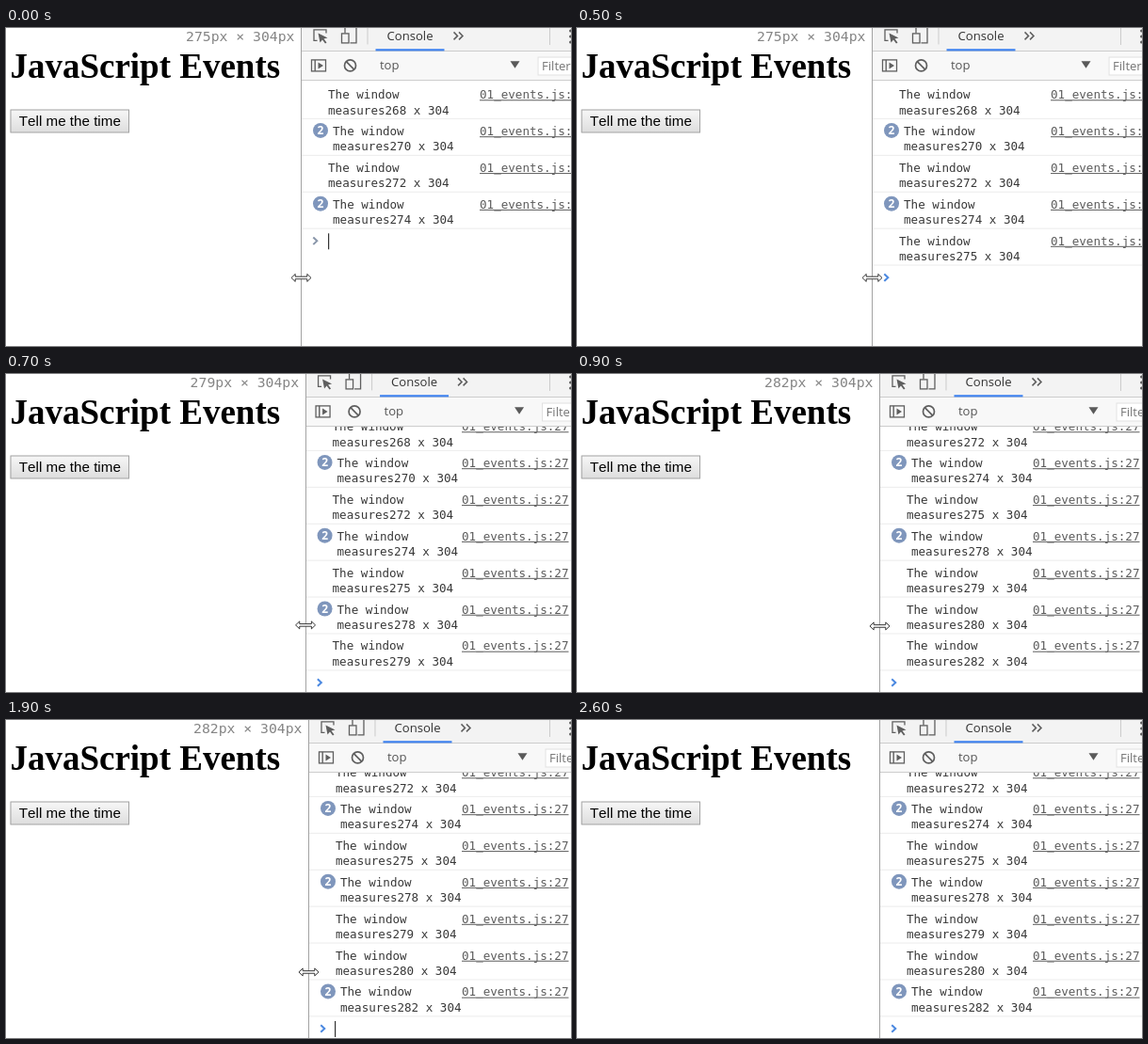
Write an HTML page with a canvas that moves like this. It is 600x338 px and loops after 2.7 s.

```html
<!DOCTYPE html>
<html lang="en">
<head>
<meta charset="utf-8">
<title>JavaScript Events</title>
<style>
  html, body { margin: 0; width: 100%; height: 100%; overflow: hidden; background: #fff; }
  canvas { display: block; }
</style>
</head>
<body>
<canvas id="stage" width="600" height="338"></canvas>
<script>
const ctx = document.getElementById('stage').getContext('2d');
const W = 600, H = 338, LOOP = 2700;
const ZOOM = 1.14, ROW = 38.9, LIST_TOP = 57;
const MONO = '"DejaVu Sans Mono", monospace';
const UI = '"Open Sans", sans-serif';
const SIZES = [268, 270, 272, 274, 275, 278, 279, 280, 282];
const REPEATED = [270, 274, 278];

// Each step: start time, page width, number of log entries.
const STEPS = [[0, 275, 4], [100, 275, 5], [600, 278, 6], [700, 279, 7], [800, 280, 8], [900, 282, 9]];

function text(str, x, y, font, color) {
  ctx.font = font;
  ctx.fillStyle = color;
  ctx.fillText(str, x, y);
}

function rect(x, y, w, h, color) {
  ctx.fillStyle = color;
  ctx.fillRect(x, y, w, h);
}

function path(points, { stroke, fill, width = 1, close = false }) {
  ctx.beginPath();
  points.forEach(([x, y]) => ctx.lineTo(x, y));
  if (close) ctx.closePath();
  if (fill) { ctx.fillStyle = fill; ctx.fill(); }
  if (stroke) { ctx.strokeStyle = stroke; ctx.lineWidth = width; ctx.stroke(); }
}

function box(x, y, w, h, stroke, width) {
  ctx.strokeStyle = stroke;
  ctx.lineWidth = width;
  ctx.strokeRect(x, y, w, h);
}

function disc(x, y, r, color) {
  ctx.fillStyle = color;
  ctx.beginPath();
  ctx.arc(x, y, r, 0, Math.PI * 2);
  ctx.fill();
}

function chevron(x, y, w, h, color, width) {
  path([[x, y - h], [x + w, y], [x, y + h]], { stroke: color, width });
}

function drawPage() {
  rect(0, 0, W, H, '#fff');
  text('JavaScript Events', 4.4, 52.5, 'bold 37px "Liberation Serif", serif', '#000');
  const shade = ctx.createLinearGradient(0, 87, 0, 111);
  shade.addColorStop(0, '#f7f7f7');
  shade.addColorStop(1, '#dddddd');
  rect(4.5, 87, 126, 24, shade);
  box(5, 87, 125.5, 24, '#a2a2a2', 1);
  text('Tell me the time', 13.8, 103.5, '15.2px "Liberation Sans", sans-serif', '#000');
}

function drawSizeLabel(width, edge) {
  ctx.textAlign = 'right';
  text(`${width}px × 304px`, edge - 7, 13.5, '14.75px ' + MONO, '#858585');
  ctx.textAlign = 'left';
}

function drawToolbars(edge) {
  const ink = '#5f5f5f';
  rect(edge, 0, W - edge, 25, '#f3f3f3');
  rect(edge, 25, W - edge, 31, '#f8f8f8');
  rect(edge, 24, W - edge, 1, '#cdcdcd');
  rect(edge, 55, W - edge, 1, '#cdcdcd');

  ctx.save();
  ctx.translate(edge, -0.6);
  // element picker and device toggle
  path([[17, 14], [13.5, 14], [13.5, 2.5], [26.5, 2.5], [26.5, 6]], { stroke: ink, width: 1.3 });
  path([[18, 6], [28, 11], [24, 12], [27, 16], [25.5, 17], [22.5, 13], [20, 16]], { fill: ink, close: true });
  path([[46.5, 6], [46.5, 0], [58.5, 0], [58.5, 16.5], [52, 16.5]], { stroke: ink, width: 1.3 });
  box(43, 6.5, 7.5, 10, ink, 1.3);
  rect(70, 0, 1, 18, '#cccccc');

  text('Console', 91, 14, '13.1px ' + UI, '#333');
  rect(79, 22.8, 73, 2.2, '#4285f0');
  chevron(162, 9, 4, 4, ink, 1.5);
  chevron(167.5, 9, 4, 4, ink, 1.5);

  // sidebar toggle and clear button
  box(11, 34.5, 15, 12, ink, 1.3);
  rect(14, 34.5, 1.4, 12, ink);
  path([[18, 37], [23.5, 40.5], [18, 44]], { fill: ink, close: true });
  ctx.beginPath();
  ctx.arc(52, 40.5, 6, 0, Math.PI * 2);
  ctx.strokeStyle = ink;
  ctx.lineWidth = 1.7;
  ctx.stroke();
  path([[47.8, 36.3], [56.2, 44.7]], { stroke: ink, width: 1.7 });

  text('top', 83.5, 45, '13.1px ' + UI, '#555');
  path([[222, 35.8], [232, 35.8], [227, 43.4]], { fill: '#5a5a5a', close: true });
  rect(251, 31, W, 20, '#fff');
  box(251.5, 31.6, W, 19, '#e0e0e0', 1);
  text('Filter', 255.5, 46, '13.1px ' + UI, '#757575');
  ctx.restore();

  rect(577, 0, 1, 18, '#cccccc');
  [3, 9, 15].forEach(y => disc(599.5, y, 1.5, ink));
}

function drawEntry(size, top, edge, linkX, repeated) {
  const font = '12.57px ' + MONO;
  const x = edge + (repeated ? 33.5 : 28.5);
  if (repeated) {
    disc(edge + 20.5, top + 13, 8, '#7f96bc');
    ctx.textAlign = 'center';
    text('2', edge + 20.5, top + 17.5, 'bold 12px ' + UI, '#fff');
    ctx.textAlign = 'left';
  }
  text('The window', x, top + 18, font, '#383838');
  text(`measures${size} x 304`, x, top + 34.5, font, '#383838');
  text('01_events.js:27', linkX, top + 18, font, '#5c5c5c');
  rect(linkX, top + 19.2, 113.5, 1.1, '#6a6a6a');
  rect(edge, top + ROW, W - edge, 1.14, '#eeeeee');
}

function drawConsole(t, edge, count) {
  const scroll = Math.max(0, LIST_TOP + count * ROW - 314.3);
  const linkX = scroll ? 484 : 503;
  ctx.save();
  ctx.beginPath();
  ctx.rect(edge, 56, W - edge, H - 56);
  ctx.clip();
  SIZES.slice(0, count).forEach((size, i) => {
    const top = LIST_TOP + i * ROW - scroll;
    const repeated = REPEATED.includes(size) || (size === 282 && t >= 1000);
    drawEntry(size, top, edge, linkX, repeated);
  });
  const promptY = LIST_TOP + count * ROW - scroll + 13.7;
  chevron(edge + 12.8, promptY, 4, 3.8, t < 100 ? '#8a97aa' : '#4a88e0', 2);
  const caretOn = t < 100 || (t >= 1000 && t < 1400) || (t >= 1900 && t < 2400);
  if (caretOn) rect(Math.floor(edge + 28.5), promptY - 8, 1.2, 17, '#333');
  ctx.restore();
}

function drawResizeCursor(x, y) {
  const half = [[-10.5, 0], [-6.3, -4], [-6.3, -1.3], [6.3, -1.3], [6.3, -4], [10.5, 0]];
  const lower = half.slice(1, -1).reverse().map(([px, py]) => [px, -py]);
  const outline = [...half, ...lower].map(([px, py]) => [x + px, y + py]);
  path(outline, { fill: '#fff', stroke: '#222', width: 0.9, close: true });
}

function draw(t) {
  const [, width, count] = STEPS.filter(([start]) => start <= t).pop();
  const edge = width * ZOOM;
  const resizing = t < 2000;
  drawPage();
  if (resizing) drawSizeLabel(width, edge);
  drawConsole(t, edge, count);
  drawToolbars(edge);
  rect(Math.floor(edge), 0, 1, H, '#a3a3a3');
  if (resizing) drawResizeCursor(edge, 265.5 + (width - 275) * 0.35);
}

ctx.fontKerning = 'none';
const origin = performance.now();
function tick() {
  draw((performance.now() - origin) % LOOP);
  requestAnimationFrame(tick);
}
tick();
</script>
</body>
</html>
```
